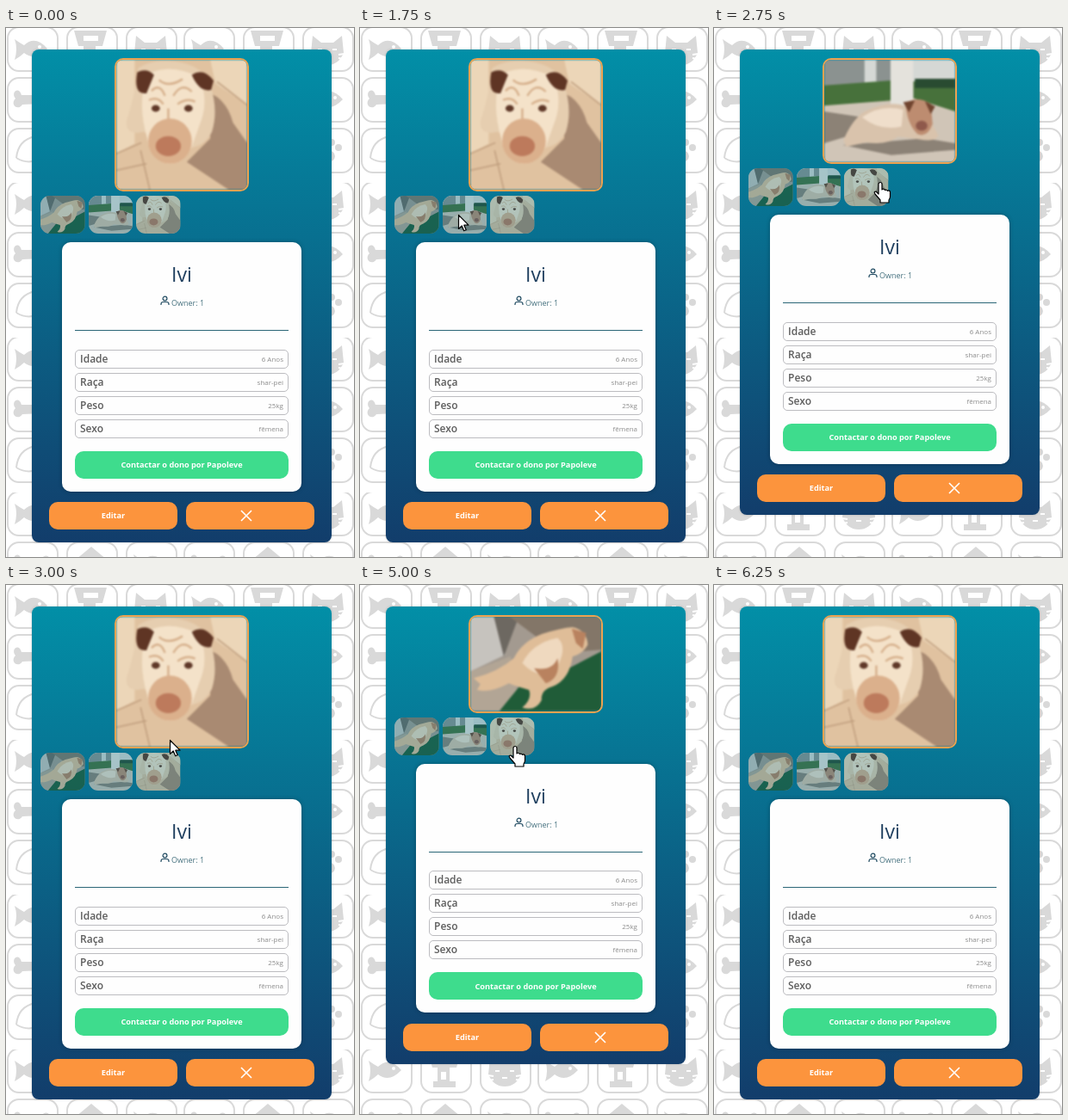
These frames come from a looping animation (404 px wide and 615 px high, 7 s). An HTML page:

```html
<!DOCTYPE html>
<html lang="pt">
<head>
<meta charset="utf-8">
<title>Ivi</title>
<style>
* { box-sizing: border-box; }
html, body { margin: 0; width: 100%; height: 100%; overflow: hidden; background: #fff; }
body { position: relative; font-family: "Open Sans", "Noto Sans", sans-serif; }
svg { display: block; }
#wall, #cursor { position: absolute; left: 0; top: 0; width: 404px; height: 615px; }
.panel { position: absolute; left: 30px; top: 25px; width: 348px; padding: 10px 10px 15px;
  border-radius: 8px; background: linear-gradient(#028fa7, #123d6b); box-shadow: 0 0 3px #0003; }
#photo { width: 156px; margin: 0 auto 5px; border: 2px solid #eda250; border-radius: 10px; overflow: hidden; }
#photo svg, .thumbs svg { width: 100%; height: 100%; }
#photo svg { filter: blur(.8px); }
.thumbs { display: flex; gap: 4px; height: 44px; margin-bottom: 10px; }
.thumbs div { width: 51.5px; border-radius: 11px; overflow: hidden; opacity: .72; }
.card { position: relative; width: 278px; height: 289.8px; margin: 0 auto 12.2px; padding: 124.8px 15px 0;
  border-radius: 10px; background: #fefefe; box-shadow: 0 0 5px #0004; }
.card > * { line-height: 1; }
.name { position: absolute; left: 0; width: 100%; top: 26px; text-align: center; font-size: 23px; color: #1f3f5f; }
.owner { position: absolute; left: 127px; top: 66px; font-size: 9px; color: #46717f; }
.icon { position: absolute; left: 114px; top: 62px; }
.rule { position: absolute; left: 15px; right: 15px; top: 102px; height: 1px; background: #2a6676; }
.row { display: flex; justify-content: space-between; align-items: center; height: 22px; margin-bottom: 5px;
  padding: 0 5px; border: 1px solid #bcbcc0; border-radius: 5px; font-size: 12px; font-weight: 600; color: #5c5c5c; }
.row span { font-size: 8px; font-weight: 500; color: #8c8c8c; }
.button { display: flex; align-items: center; justify-content: center; height: 32px; border-radius: 10px;
  color: #fff; font-size: 9.2px; font-weight: 700; }
.contact { margin-top: 15px; background: #3edc8d; }
.actions { display: flex; gap: 10px; padding: 0 10px; }
.actions .button { flex: 1; background: #fc943d; }
.actions svg { margin-right: 10px; }
</style>
</head>
<body>
<svg id="wall">
  <defs>
    <g id="fish"><path d="M-20-11Q-13-6-9-4Q4-16 18 0Q4 15-9 5Q-13 9-20 13Q-16 0-20-11Z"/><circle cx="9" cy="-2" r="2" fill="#fff"/></g>
    <path id="bone" d="M-12-5C-15-16-25-8-19-1C-26 6-16 14-11 6L11 5C15 15 25 8 19 0C25-8 15-14 11-5Z"/>
    <g id="bowl"><path d="M-20-21H18L13-3H5V13H12V20H-14V13H-9V-3H-15Z"/><path d="M-9-15H8V-9H-9ZM-5 2H1V11H-5Z" fill="#fff"/></g>
    <g id="cat"><path d="M-17-15L-7-7H7L17-15L19 5Q13 19 0 19T-19 5Z"/>
      <path d="M-11 1h5M6 1h5M-3 9h6M-27 5l14 2M-26 13l13-2M27 5l-14 2M26 13l-13-2" stroke="#fff" stroke-width="2"/></g>
    <g id="house"><path d="M0-20L24 0H17V18H-17V0H-24Z"/><path d="M-7 18V5a7 7 0 0 1 14 0V18Z" fill="#fff"/></g>
    <path id="ball" d="M-18 9Q-16-12 4-16M-18 9Q0 20 17 4" fill="none" stroke="#d9d9d9" stroke-width="2"/>
    <path id="heart" d="M0 15Q-36-7-14-15Q-5-17 0-8Q5-17 14-15Q36-7 0 15Z"/>
    <g id="paw"><ellipse cy="7" rx="9" ry="7"/><circle cx="-12" cy="-3" r="4"/><circle cx="-4" cy="-9" r="4"/><circle cx="5" cy="-9" r="4"/><circle cx="13" cy="-3" r="4"/></g>
    <pattern id="tiles" width="205" height="180" patternUnits="userSpaceOnUse"></pattern>

    <symbol id="lying" viewBox="0 0 156 114" preserveAspectRatio="xMidYMid slice">
      <path fill="#a39a90" d="M0 0H156V114H0Z"/>
      <path fill="#c6c3be" d="M0 0H28L42 46L0 66Z"/>
      <path fill="#6d6861" d="M28 0H58L40 48Z"/>
      <path fill="#837668" d="M46 0H156V40L105 44Z"/>
      <path fill="#b2a595" d="M0 66L48 48L60 114H0Z"/>
      <path fill="#205c38" d="M34 114L60 82L110 66L156 42V114Z"/>
      <path fill="#dfbd98" d="M4 74Q34 66 52 50Q62 30 86 21Q108 14 122 13Q139 17 140 34Q134 45 122 48Q118 76 98 84Q84 88 85 100Q78 114 62 109Q74 99 70 88Q56 84 46 80Q24 92 8 88L12 81Z"/>
      <path fill="#efd9bf" d="M62 56Q74 32 104 26Q118 38 100 66Q80 76 62 56Z"/>
      <path fill="#b9825f" d="M76 62Q98 66 104 50Q108 74 90 80ZM121 15L138 20L134 39L126 32Z"/>
    </symbol>
    <symbol id="porch" viewBox="0 0 156 123" preserveAspectRatio="xMidYMid slice">
      <path fill="#d0c5b7" d="M0 0H156V123H0Z"/>
      <path fill="#d5d8d5" d="M0 0H156V28H0Z"/>
      <path fill="#8b9290" d="M0 0H48V32H0ZM62 0H80V26H62Z"/>
      <path fill="#47713b" d="M0 31L80 25V49L0 55ZM106 26H156V62L106 46Z"/>
      <path fill="#294b31" d="M108 23H156V34H108Z"/>
      <path fill="#e4e2dc" d="M79 0H106V58H79Z"/>
      <path fill="#8c8276" d="M0 62L52 70L33 90L0 100ZM22 102L120 94L156 100V108L80 114Z"/>
      <path fill="#d9c3ac" d="M23 96Q33 72 48 62Q76 49 96 55L126 72L136 91Q132 99 112 95L88 92Q74 103 50 99L26 104Z"/>
      <path fill="#efdecb" d="M45 69Q67 53 94 60L92 80Q66 86 45 69Z"/>
      <path fill="#bd8c70" d="M97 52Q111 43 127 53L129 77Q123 94 111 89Q98 76 97 52Z"/>
      <path fill="#70442f" d="M94 51L108 49L101 63ZM120 50L132 56L127 65Z"/>
      <ellipse cx="116" cy="79" rx="7" ry="6" fill="#8f594b"/>
    </symbol>
    <symbol id="face" viewBox="0 0 156 155" preserveAspectRatio="xMidYMid slice">
      <path fill="#e0c2a0" d="M0 0H156V155H0Z"/>
      <path fill="#ecd6b8" d="M0 0H22V100L0 112ZM112 0H156V54L118 28Z"/>
      <path fill="#a98a72" d="M112 40Q132 48 139 75L156 99V155H134L84 122L112 94Z"/>
      <path fill="none" stroke="#bf9d7d" stroke-width="1.5" d="M0 112L30 99M40 155L29 108M0 132L36 124M120 26L156 54"/>
      <path fill="#e6ceb0" d="M26 10Q46-3 77 3Q105 9 112 30Q122 60 114 86Q104 106 82 105L32 86Q12 91 12 74Q23 40 26 10Z"/>
      <path fill="#f4e2c9" d="M36 18Q62 3 98 20Q110 44 102 70L90 104Q80 124 62 124Q40 120 37 94Q25 54 36 18Z"/>
      <path fill="#5f3524" d="M25 15Q36 9 45 18L36 40Q20 42 25 15ZM90 18Q104 9 116 25L113 36Q99 39 90 18Z"/>
      <path fill="none" stroke="#d6b08c" stroke-width="2.5" d="M42 37Q52 27 58 43M68 43Q78 26 90 38M51 24Q62 34 79 23M39 48Q50 43 56 53M73 53Q84 45 94 50M62 58V72"/>
      <ellipse cx="64" cy="97" rx="26" ry="27" fill="#dbb08c"/>
      <ellipse cx="62" cy="103" rx="15" ry="12" fill="#bd7a5c"/>
      <ellipse cx="47" cy="58" rx="5" ry="4" fill="#5f3828"/>
      <ellipse cx="86" cy="58" rx="5" ry="4" fill="#5f3828"/>
    </symbol>
  </defs>
  <rect width="404" height="615" fill="url(#tiles)"/>
</svg>

<div class="panel">
  <div id="photo"><svg><use href="#face"/></svg></div>
  <div class="thumbs">
    <div><svg><use href="#lying"/></svg></div>
    <div><svg><use href="#porch"/></svg></div>
    <div><svg><use href="#face"/></svg></div>
  </div>
  <div class="card">
    <div class="name">Ivi</div>
    <svg class="icon" width="11" height="12" fill="none" stroke="#234d63" stroke-width="1.2"><circle cx="5.5" cy="3.5" r="2.4"/><path d="M1 11V10Q1 7.5 3.5 7.5H7.5Q10 7.5 10 10V11"/></svg>
    <div class="owner">Owner: 1</div>
    <div class="rule"></div>
    <div class="row">Idade <span>6 Anos</span></div>
    <div class="row">Raça <span>shar-pei</span></div>
    <div class="row">Peso <span>25kg</span></div>
    <div class="row">Sexo <span>fêmena</span></div>
    <div class="button contact">Contactar o dono por Papoleve</div>
  </div>
  <div class="actions">
    <div class="button">Editar</div>
    <div class="button"><svg width="14" height="14" stroke="#fff" stroke-width="1.6"><path d="M1 1L13 13M13 1L1 13"/></svg></div>
  </div>
</div>

<svg id="cursor" stroke="#000" fill="#fff" stroke-width="1.2" stroke-linejoin="round">
  <path id="arrow" d="M.5.5V16.5L4.2 13L6.7 18.8L9.2 17.8L6.8 12.2H12Z"/>
  <path id="hand" d="M-2 14V2.5a2 2 0 0 1 4 0V9a2 2 0 0 1 3.5.6a2 2 0 0 1 3 .8a1.8 1.8 0 0 1 3 1.3V17q0 2-1.5 4v3H0v-3L-6 14q-2-3 1-3Z"/>
</svg>

<script>
const $ = id => document.getElementById(id);
const LOOP = 7000;

const icons = [["fish", "bowl", "cat"], ["bone", "house", "fish"], ["ball", "heart", "paw"]];
$("tiles").innerHTML = icons.map((row, r) => row.map((icon, c) =>
  `<g transform="translate(${30 + 69 * c} ${24 + 59 * r})" fill="#d9d9d9">
    <rect x="-28" y="-25" width="58" height="51" rx="13" fill="none" stroke="#d9d9d9" stroke-width="2"/>
    <use href="#${icon}"/></g>`).join("")).join("");

// Start time, picture, height
const photos = [[0, "face", 155], [2000, "porch", 123], [3000, "face", 155], [4250, "lying", 113.6], [5250, "face", 155]];

// Start time, shape, x, y
const pointer = [
  [0], [500, "arrow", 139, 261], [750, "hand", 170, 226], [1000, "hand", 190, 196], [1250, "hand", 172, 212],
  [1500, "hand", 118, 217], [1750, "arrow", 114, 217], [2250, "arrow", 122, 210], [2500, "hand", 172, 193],
  [2750, "hand", 193, 179], [3000, "arrow", 190, 180], [3250, "arrow", 148, 187], [3500, "hand", 62, 200],
  [3750, "hand", 64, 212], [4000, "arrow", 62, 210], [4500, "hand", 74, 193], [4750, "hand", 176, 182],
  [5000, "hand", 180, 187], [5250, "arrow", 178, 187], [5750, "hand", 172, 228], [6000, "arrow", 153, 424], [6250]
];

const at = (steps, t) => steps.findLast(step => step[0] <= t);

function draw() {
  const t = performance.now() % LOOP;
  const [, photo, height] = at(photos, t);
  $("photo").style.height = height + "px";
  $("photo").querySelector("use").setAttribute("href", "#" + photo);

  const [, shape, x, y] = at(pointer, t);
  for (const id of ["arrow", "hand"]) $(id).style.display = id === shape ? "" : "none";
  if (shape) $(shape).setAttribute("transform", `translate(${x} ${y})`);
  requestAnimationFrame(draw);
}
draw();
</script>
</body>
</html>
```
